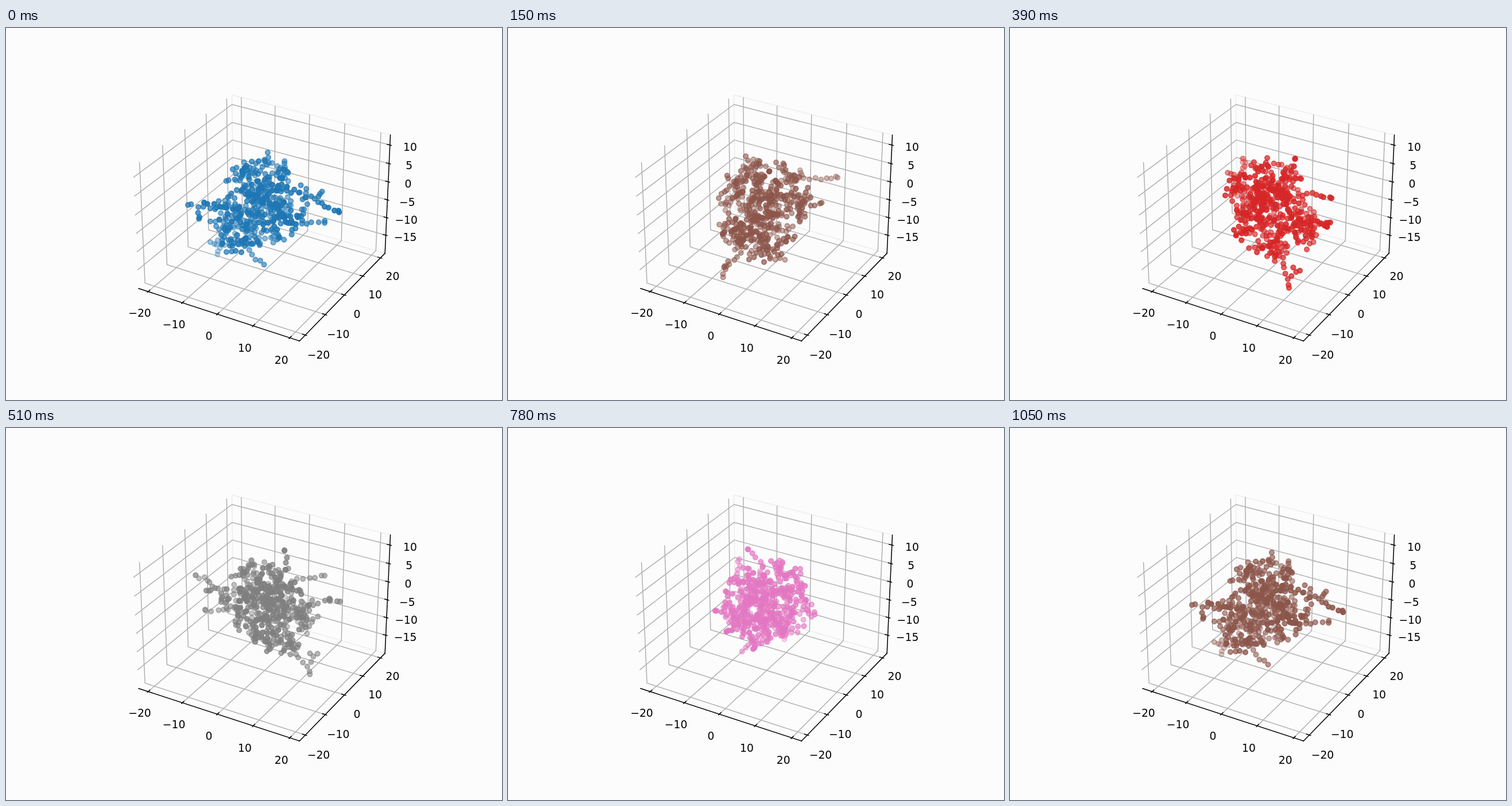
Write an HTML page with a canvas that moves like this. It is 864 px wide and 648 px high and loops after 1.08 s.

```html
<!DOCTYPE html>
<html lang="en">
<head>
<meta charset="utf-8">
<title>Rotating 3D scatter</title>
<style>
  html, body { margin: 0; width: 864px; height: 648px; overflow: hidden; background: #fcfcfc; }
  svg, canvas { position: absolute; left: 0; top: 0; display: block; }
  text { font: 18.75px "DejaVu Sans", sans-serif; text-anchor: middle; fill: #000; }
  path { fill: none; stroke-width: 1.5; stroke-linejoin: round; }
  .pane { stroke: #ededed; }
  .grid { stroke: #b0b0b0; }
  .axis, .tick { stroke: #000; stroke-linecap: square; }
</style>
</head>
<body>
<svg id="axes" width="864" height="648" viewBox="0 0 864 648"></svg>
<canvas id="dots" width="864" height="648"></canvas>
<script>
const STEP = 30, FRAMES = 36, TAU = 2 * Math.PI;
const COLORS = ['#1f77b4', '#ff7f0e', '#2ca02c', '#d62728', '#9467bd',
                '#8c564b', '#e377c2', '#7f7f7f', '#bcbd22', '#17becf'];
const S30 = 0.5, C30 = Math.sqrt(3) / 2;
const UNIT = 0.0262;
const W = 0.5952, H = 0.4464;   // half sizes of the box

// Camera raised 30 degrees: right, back and up to screen, plus distance.
function project(right, back, up) {
  const dist = 10 + C30 * back - S30 * up;
  const scale = 2697.1 / dist;
  return [449.54 + scale * right, 320.5 - scale * (S30 * back + C30 * up), dist];
}
const boxPoint = ([x, y, z]) => project(C30 * x + S30 * y, C30 * y - S30 * x, z);
const flat = v => 0.003 + UNIT * v;
const tall = v => 0.1023 + 0.02714 * v;

// ---- axes ----
const svg = document.getElementById('axes');
function add(tag, attrs, text = '') {
  const el = document.createElementNS('http://www.w3.org/2000/svg', tag);
  for (const key in attrs) el.setAttribute(key, attrs[key]);
  el.textContent = text;
  svg.appendChild(el);
}
function line(cls, ...points) {
  const d = points.map(p => boxPoint(p).slice(0, 2).map(v => v.toFixed(2)).join(' '));
  add('path', { class: cls, d: 'M' + d.join('L') });
}
const move = (p, by, amount = 1) => p.map((v, i) => v + by[i] * amount);

// Each axis: its edge, two grid walls, outward tick direction and label shift.
const axes = [
  { from: -20, to: 20, step: 10, at: v => [flat(v), -W, -H], ends: [[-W, -W, -H], [W, -W, -H]],
    walls: ([x]) => [[x, -W, -H], [x, W, -H], [x, W, H]], out: [0, -1, 0], label: [0, -0.104, -0.103] },
  { from: -20, to: 20, step: 10, at: v => [W, flat(v), -H], ends: [[W, -W, -H], [W, W, -H]],
    walls: ([, y]) => [[W, y, -H], [-W, y, -H], [-W, y, H]], out: [1, 0, 0], label: [0.0955, 0, -0.114] },
  { from: -15, to: 10, step: 5, at: v => [W, W, tall(v)], ends: [[W, W, -H], [W, W, H]],
    walls: ([, , z]) => [[-W, -W, z], [-W, W, z], [W, W, z]], out: [1, 0, 0], label: [0.124, 0.0415, 0] }
];
function eachTick(axis, run) {
  for (let v = axis.from; v <= axis.to; v += axis.step) run(axis.at(v), v);
}
line('pane', [-W, W, -H], [-W, W, H], [W, W, H], [W, W, -H], [-W, W, -H]);
for (const axis of axes) eachTick(axis, p => line('grid', ...axis.walls(p)));
for (const axis of axes) {
  line('axis', ...axis.ends);
  eachTick(axis, (p, v) => {
    line('tick', move(p, axis.out, -W / 30), move(p, axis.out, W / 60));
    const [x, y] = boxPoint(move(p, axis.label));
    add('text', { x, y: y + 6.8 }, String(v).replace('-', '\u2212'));
  });
}

// ---- branching cluster ----
let seed = 20;
function rand() {
  seed = (seed + 0x6d2b79f5) | 0;
  let t = Math.imul(seed ^ (seed >>> 15), 1 | seed);
  t = (t + Math.imul(t ^ (t >>> 7), 61 | t)) ^ t;
  return ((t ^ (t >>> 14)) >>> 0) / 4294967296;
}
const gap = (a, b) => Math.hypot(a[0] - b[0], a[1] - b[1], a[2] - b[2]);
const cluster = [[0, 0, 0]];
const SPACING = 1.45;
const nearest = goal => cluster.reduce((best, p) => gap(p, goal) < gap(best, goal) ? p : best);

// A random place in a rounded body whose lower part leans to one side.
function randomGoal() {
  const turn = rand() * TAU, rise = rand() * 2 - 1;
  const r = Math.pow(rand(), 0.45), ring = r * Math.sqrt(1 - rise * rise);
  const z = -2 + 13 * r * rise;
  return [13 * ring * Math.cos(turn) + 0.35 * Math.min(0, z), 13 * ring * Math.sin(turn), z];
}
// Adds one point, a step from the nearest one towards the goal.
function grow(goal, wobble) {
  const root = nearest(goal), d = gap(root, goal);
  if (d < SPACING) return false;
  cluster.push(root.map((v, i) => v + (goal[i] - v) * SPACING / d + (rand() - 0.5) * wobble));
  return true;
}
while (cluster.length < 420) grow(randomGoal(), 0.5);

// The longest arms.
const tips = [
  [-18.6, -1.7, -0.9], [18, -8.5, 0.9], [-11.8, 4.2, -18.1], [0, -6, -14.9],
  [-13.5, 2.2, -13.4], [14.9, -2.1, -5], [-15.8, -5.7, -2.4], [-14.4, -7.4, 2.9],
  [0.9, 7.1, 8.6], [-4.6, -4.6, 10.6], [6.7, -12, 0], [14.2, 0.4, 1.6]
];
for (const tip of tips) {
  while (grow(tip, 0.9));
  cluster.push(tip);
}
while (cluster.length < 490) grow(randomGoal(), 0.5);

// ---- animation ----
const ctx = document.getElementById('dots').getContext('2d');
function draw(frame) {
  const angle = TAU * frame / (FRAMES - 1);
  const c = Math.cos(angle), s = Math.sin(angle);
  const dots = cluster.map(([x, y, z]) =>
    project(UNIT * (x * c - y * s), UNIT * (x * s + y * c), tall(z)));
  dots.sort((a, b) => b[2] - a[2]);
  const far = dots[0][2], near = dots[dots.length - 1][2];
  ctx.clearRect(0, 0, 864, 648);
  ctx.fillStyle = ctx.strokeStyle = COLORS[frame % COLORS.length];
  ctx.lineWidth = 1.9;
  for (const [x, y, dist] of dots) {
    ctx.globalAlpha = 1 - 0.7 * (dist - near) / (far - near);
    ctx.beginPath();
    ctx.arc(x, y, 4.19, 0, TAU);
    ctx.fill();
    ctx.stroke();
  }
}
const start = performance.now();
let shown = -1;
function tick() {
  const frame = Math.floor((performance.now() - start) / STEP) % FRAMES;
  if (frame !== shown) draw(shown = frame);
  requestAnimationFrame(tick);
}
tick();
</script>
</body>
</html>
```
